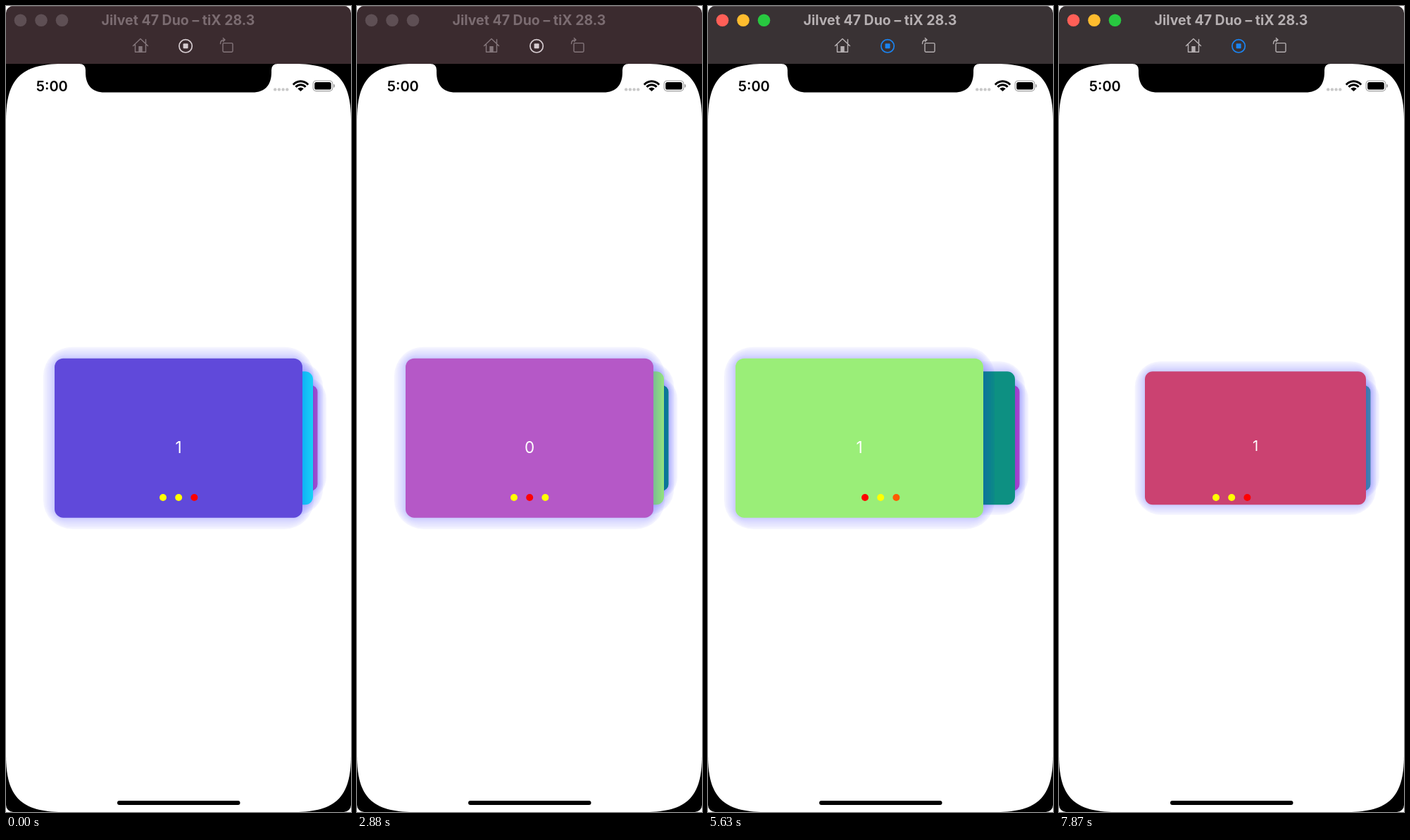
These frames come from a looping animation (490 by 1143 pixels, 7990 ms). An HTML page with a canvas:

```html
<!DOCTYPE html>
<html lang="en">
<head>
<meta charset="utf-8">
<title>Card stack</title>
<style>
  html, body { margin: 0; width: 100%; height: 100%; overflow: hidden; background: #fff; }
  canvas { display: block; width: 490px; height: 1143px; }
</style>
</head>
<body>
<canvas id="stage"></canvas>
<script>
const W = 490, H = 1143, LOOP = 7990, STEP = 125, FOCUS_AT = 5500;
const FONT = 'Inter, "Liberation Sans", sans-serif';
const canvas = document.getElementById('stage');
const ctx = canvas.getContext('2d');
const dpr = window.devicePixelRatio || 1;
canvas.width = W * dpr;
canvas.height = H * dpr;

const COLORS = ['#6049da', '#18ddf6', '#b558c7', '#9aee78', '#0d9082', '#c04fc2', '#cb4271', '#4a94a4', '#d8a04c'];
// Stack slots, front to back: centre x, width, height, scale
const SLOTS = [[245, 352, 226, 1], [279, 314, 189, .89], [304.5, 276, 150, .78]];
const CARD_Y = 612.7;

// Poses of a swipe: drag to the left, rise of the stack, fade of the old dot
const idle = [0, 0, 0], fly = [270, 0, .75], gone = [600, 0, 1], done = [600, 1, 1];
const swipe = drag => [[drag, 0, .36], fly, gone, [600, .75, 1], done];
const SWIPES = [
  [380, swipe(40)],
  [2380, swipe(40)],
  [4380, swipe(24)],
  [FOCUS_AT, [idle, ...swipe(30)]],
  [6620, [[12, 0, 0], [150, 0, .4], [600, 0, .78], gone, [600, .5, 1], [600, .9, 1], done]],
  [7620, swipe(40)]
];

const mix = (a, b, p) => a + (b - a) * p;

function box(x, y, w, h, r, fill) {
  ctx.beginPath();
  ctx.roundRect(x, y, w, h, r);
  ctx.fillStyle = fill;
  ctx.fill();
}

function disc(x, y, r, fill) {
  ctx.beginPath();
  ctx.arc(x, y, r, 0, Math.PI * 2);
  ctx.fillStyle = fill;
  ctx.fill();
}

function text(str, x, y, size, weight, fill) {
  ctx.font = `${weight} ${size}px ${FONT}`;
  ctx.textAlign = 'center';
  ctx.fillStyle = fill;
  ctx.fillText(str, x, y);
}

function line(path, color, width) {
  ctx.strokeStyle = color;
  ctx.lineWidth = width;
  ctx.stroke(new Path2D(path));
}

function titleBar(focused) {
  const ink = focused ? '#b6b0b2' : '#84767b';
  const stop = focused ? '#1a84f2' : '#d6ccd0';
  box(0, 0, W, 82, 0, focused ? '#393234' : '#3b2b2f');
  box(0, 0, W, 1, 0, focused ? '#5c5658' : '#5b4d51');
  const lights = focused ? ['#ff5f57', '#febc2e', '#28c840'] : Array(3).fill('#5e4f54');
  lights.forEach((c, i) => disc(20.5 + 29.5 * i, 20.3, 8.8, c));
  text('Jilvet 47 Duo – tiX 28.3', 244.5, 26.5, 19.5, 700, focused ? '#b6b0b2' : '#7b6c71');

  ctx.lineJoin = ctx.lineCap = 'round';
  line('M180.5 56.5 L191 46.5 L201.5 56.5 M183.5 54.5 V65.3 H198.5 V54.5 M198.5 53 V47.5', ink, 1.4);
  box(188.3, 57, 5.4, 8, 0, ink);
  line('M264.3 56.8 A9.2 9.2 0 1 1 245.9 56.8 A9.2 9.2 0 1 1 264.3 56.8', stop, 1.7);
  box(251.6, 53.3, 7, 7, 1, stop);
  line('M309.5 52.6 H320.5 Q322 52.6 322 54 V63.8 Q322 65.2 320.5 65.2 H309.5 Q308 65.2 308 63.8 V54 Q308 52.6 309.5 52.6', ink, 1.4);
  line('M304.5 53.5 Q304.5 48 310.5 48 M308.3 45.4 L311 48 L308.3 50.6', ink, 1.4);
}

function screen() {
  const L = 80, k = 21.6, top = 82;
  ctx.fillStyle = '#000';
  ctx.fillRect(0, top, W, H - top);
  ctx.fillStyle = '#fff';
  ctx.fill(new Path2D(`M0 ${top + L} C0 ${top + k} ${k} ${top} ${L} ${top}
    H${W - L} C${W - k} ${top} ${W} ${top + k} ${W} ${top + L}
    V${H - L} C${W} ${H - k} ${W - k} ${H} ${W - L} ${H}
    H${L} C${k} ${H} 0 ${H - k} 0 ${H - L} Z`));
  ctx.fillStyle = '#000';
  ctx.fill(new Path2D('M104 82 Q113 82 113 91 V94 C113 112 122 122.5 140 122.5 H350 C368 122.5 377 112 377 94 V91 Q377 82 386 82 Z'));
}

function statusBar() {
  text('5:00', 65.3, 120.5, 20, 600, '#000');
  for (let i = 0; i < 4; i++) disc(382.2 + 5.7 * i, 118.4, 2.2, '#c9c9c9');

  ctx.save();
  ctx.beginPath();
  ctx.moveTo(418.5, 121);
  ctx.arc(418.5, 121, 16, -Math.PI * .77, -Math.PI * .23);
  ctx.clip();
  ctx.lineWidth = 3;
  ctx.strokeStyle = '#000';
  for (const r of [14.2, 9.3]) {
    ctx.beginPath();
    ctx.arc(418.5, 121, r, Math.PI, 0);
    ctx.stroke();
  }
  disc(418.5, 121, 5.6, '#000');
  ctx.restore();

  ctx.beginPath();
  ctx.roundRect(436.2, 106, 27.6, 14.6, 4.3);
  ctx.strokeStyle = '#a0a0a0';
  ctx.lineWidth = 1.2;
  ctx.stroke();
  box(438.2, 108, 23.6, 10.6, 2.6, '#000');
  box(465.2, 110.8, 1.8, 5, [0, 1.8, 1.8, 0], '#a0a0a0');
}

function card(index, [cx, w, h, s], alpha = 1) {
  const x = cx - w / 2, y = CARD_Y - h / 2;
  ctx.globalAlpha = alpha;
  [16, 13.5, 11, 8.5, 6, 4, 2].forEach((spread, i) => {
    const e = spread * s;
    box(x - e, y - e, w + 2 * e, h + 2 * e, 12 * s + e * 1.8, `rgba(10,10,250,${i ? .026 : .048})`);
  });
  box(x, y, w, h, 12.5 * s, COLORS[index]);
  text((index + 1) % 3, cx, CARD_Y + 20.8 * s, 22.5 * s, 400, '#fff');
  ctx.globalAlpha = 1;
}

function stack(first, [drag, rise]) {
  const between = (a, b) => SLOTS[a].map((v, i) => mix(v, SLOTS[b][i], rise));
  if (rise) card(first + 3 - (first + 3 >= COLORS.length ? COLORS.length : 0), SLOTS[2], rise);
  card(first + 2, between(2, 1));
  card(first + 1, between(1, 0));
  if (drag < 600) {
    const [cx, ...size] = SLOTS[0];
    card(first, [cx - drag, ...size]);
  }
}

function dots(first, fade) {
  const old = (first + 2) % 3, next = (old + 1) % 3;
  for (let i = 0; i < 3; i++) {
    let green = 255;
    if (i === old) green = 255 * fade;
    if (i === next && fade > 0) green = 0;
    disc(223 + 22.2 * i, 697, 5, `rgb(255,${Math.round(green)},0)`);
  }
}

function draw(t) {
  let first = 0, pose = idle;
  SWIPES.forEach(([start, poses], i) => {
    if (t < start) return;
    const step = Math.floor((t - start + 10) / STEP);
    first = i;
    pose = poses[Math.min(step, poses.length - 1)];
  });
  if (pose === done) {
    first++;
    pose = idle;
  }

  ctx.setTransform(dpr, 0, 0, dpr, 0, 0);
  ctx.clearRect(0, 0, W, H);
  ctx.save();
  ctx.beginPath();
  ctx.roundRect(0, 0, W, H, 10);
  ctx.clip();
  titleBar(t >= FOCUS_AT);
  screen();
  statusBar();
  stack(first, pose);
  dots(first, pose[2]);
  box(158, 1127, 174.5, 6, 3, '#000');
  ctx.restore();
}

const began = performance.now();
function tick() {
  draw((performance.now() - began) % LOOP);
  requestAnimationFrame(tick);
}
tick();
</script>
</body>
</html>
```
